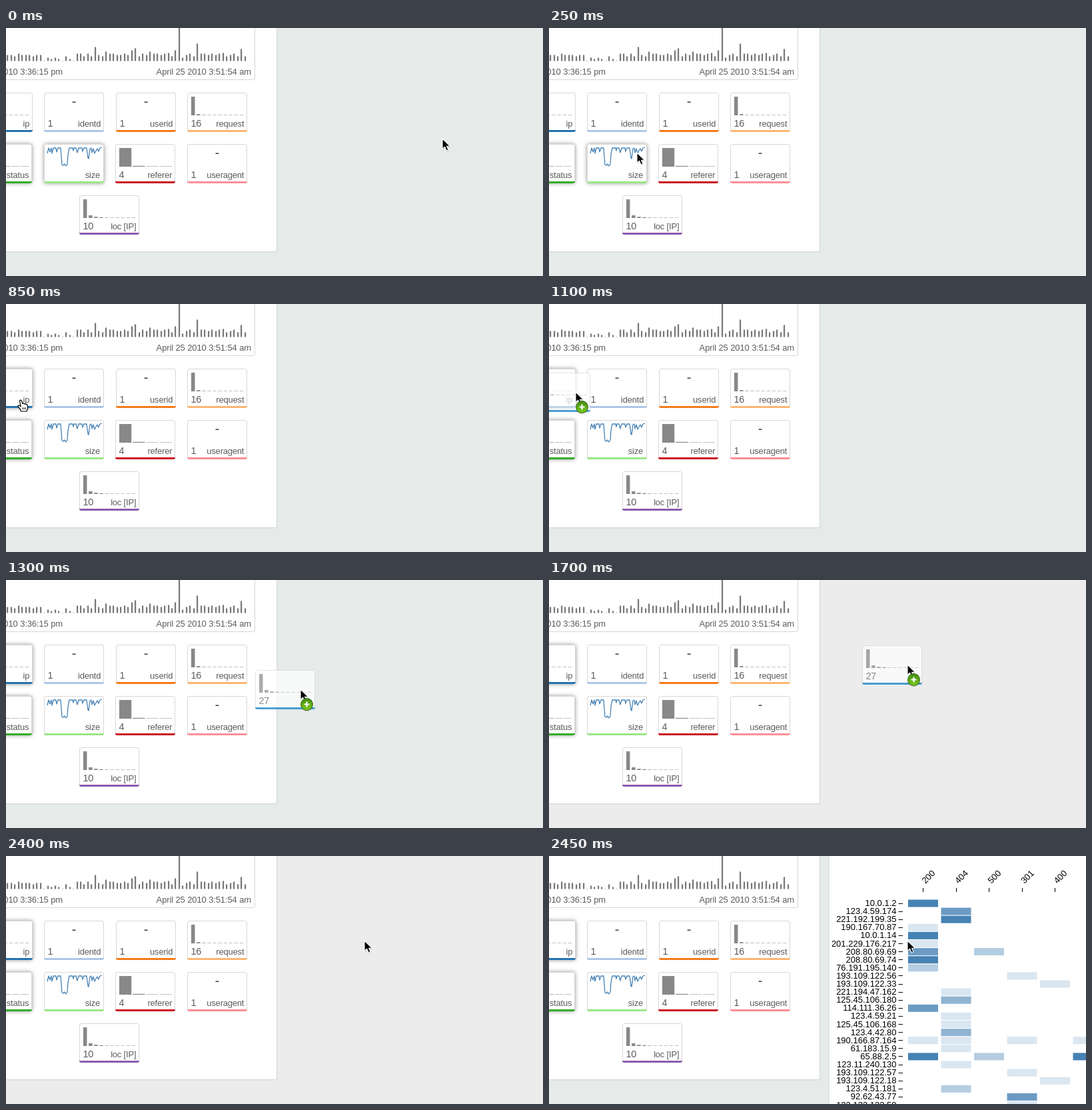
Animation of 806 by 372 pixels, one loop 3550 ms. Source, as an HTML page:

```html
<!DOCTYPE html>
<html lang="en">
<head>
<meta charset="utf-8">
<title>Drag a field onto the canvas</title>
<style>
html, body { margin: 0; width: 100%; height: 100%; overflow: hidden; background: #e6eae9; }
svg { display: block; width: 806px; height: 372px; }
text { font: 13px "Liberation Sans", Arial, sans-serif; fill: #5c5c5c; letter-spacing: -.2px; }
.date { letter-spacing: -.12px; }
.count { font-size: 14.5px; }
.dash { font-size: 20px; fill: #444; }
.axis { fill: #000; letter-spacing: 0; }
.end { text-anchor: end; }
.mid { text-anchor: middle; }

.bg, .results, .pointer, .arrow, .hand, .drag, .glow { animation: 3550ms step-end infinite; }
.bg { animation-name: bg; }
.results { animation-name: results; }
.pointer { animation-name: move; }
.arrow { animation-name: arrow; }
.hand { animation-name: hand; }
.drag { animation-name: drag; }
.glow { animation-name: none; }
.glow.size { animation-name: deselect; }
.glow.ip { animation-name: select; }

/* 50 ms = 1.4084 % */
@keyframes move {
  0%       { transform: translate(655px, 166px); animation-timing-function: steps(2); }
  2.8169%  { transform: translate(560px, 170px); animation-timing-function: steps(3); }
  7.0422%  { transform: translate(132px, 187px); animation-timing-function: steps(2); }
  9.8591%  { transform: translate(104px, 200px); animation-timing-function: steps(4); }
  15.4929% { transform: translate(100px, 203px); animation-timing-function: steps(5); }
  22.5352% { transform: translate(24px, 147px); }
  23.9436% { transform: translate(23px, 144px); animation-timing-function: steps(4); }
  29.5774% { transform: translate(18px, 126px); }
  30.9859% { transform: translate(40px, 132px); animation-timing-function: steps(3); }
  35.2112% { transform: translate(330px, 166px); }
  36.6197% { transform: translate(442px, 164px); animation-timing-function: steps(2); }
  39.4366% { transform: translate(515px, 140px); animation-timing-function: steps(3); }
  43.6619%, 100% { transform: translate(538px, 127px); }
}
@keyframes bg {
  0%       { fill: #e6eae9; }
  38.0281% { fill: #e6eae9; animation-timing-function: steps(4); }
  43.6619% { fill: #ececec; }
  69.0140%, 100% { fill: #e6eae9; }
}
@keyframes results  { 0% { opacity: 0; } 69.0140%, 100% { opacity: 1; } }
@keyframes arrow    { 0% { opacity: 1; } 8.4507% { opacity: 0; } 30.9859%, 100% { opacity: 1; } }
@keyframes hand     { 0% { opacity: 0; } 8.4507% { opacity: 1; } 30.9859%, 100% { opacity: 0; } }
@keyframes drag     { 0% { opacity: 0; } 30.9859% { opacity: 1; } 64.7887%, 100% { opacity: 0; } }
@keyframes deselect { 0% { opacity: 1; } 15.4929%, 100% { opacity: 0; } }
@keyframes select   { 0% { opacity: 0; } 23.9436%, 100% { opacity: 1; } }
</style>
</head>
<body>
<svg viewBox="0 0 806 372" xmlns="http://www.w3.org/2000/svg">
  <defs>
    <filter id="blur" x="-20%" y="-25%" width="140%" height="150%"><feGaussianBlur stdDeviation="3"/></filter>
    <linearGradient id="green" x1="0" y1="0" x2="0" y2="1">
      <stop offset="0" stop-color="#3f8a12"/><stop offset="1" stop-color="#7ccb1c"/>
    </linearGradient>
  </defs>
  <rect class="bg" width="806" height="372" fill="#e6eae9"/>

  <rect x="-10" y="-10" width="417.5" height="346.5" rx="3" fill="#000" opacity=".06"/>
  <rect x="-10.5" y="-10.5" width="417" height="346" rx="3" fill="#fff" stroke="#d9dcdb"/>
  <rect x="-10.5" y="-10.5" width="384" height="88" rx="2" fill="#fff" stroke="#d6d6d6"/>
  <g id="timeline" fill="#777"></g>
  <text class="date end" x="85" y="70">2010 3:36:15 pm</text>
  <text class="date end" x="368" y="70">April 25 2010 3:51:54 am</text>

  <g id="cards"></g>

  <g class="results" id="results" opacity="0">
    <rect x="420.5" y="-5" width="400" height="390" fill="#fff" stroke="#d9dcdb"/>
  </g>

  <g class="pointer">
    <g class="drag" id="drag" opacity="0"></g>
    <g class="arrow">
      <path d="M0 0V15.5L3.6 12.2 6.2 18 9 16.8 6.5 11.2H11.4Z" fill="#000" opacity=".18" transform="translate(.5 1.5)"/>
      <path d="M0 0V15.5L3.6 12.2 6.2 18 9 16.8 6.5 11.2H11.4Z" fill="#000" stroke="#fff" stroke-width="1.1" stroke-linejoin="round"/>
    </g>
    <g class="hand" opacity="0">
      <path d="M-2.5 1.2Q-1-.8 .5 1.2L2 5.5Q3.5 4.2 4.6 6 6.2 5 7.2 7 9.3 6.5 9.6 9V12.5L8 17H-.5L-1.5 14-5 9.8Q-5.2 7.6-3 8.2L-.8 9.8Z"
            fill="#fff" stroke="#000" stroke-width="1.2" stroke-linejoin="round"/>
      <path d="M2 11.2V14.2M4.2 11.2V14.2M6.4 11.2V14.2" stroke="#000" stroke-width=".9"/>
    </g>
    <g class="drag" opacity="0">
      <g transform="translate(9.5 22.5)">
        <circle cy="1" r="9.4" opacity=".2"/>
        <circle r="9" fill="url(#green)" stroke="#3c6d16"/>
        <path d="M-4 0H4M0-4V4" stroke="#fff" stroke-width="2.2"/>
      </g>
    </g>
  </g>
</svg>
<script>
const NS = 'http://www.w3.org/2000/svg';
const byId = id => document.getElementById(id);

function add(parent, tag, attrs, text) {
  const node = document.createElementNS(NS, tag);
  for (const key in attrs) node.setAttribute(key, attrs[key]);
  if (text !== undefined) node.textContent = text;
  return parent.appendChild(node);
}

// Timeline histogram
const heights = [
  9, 9, 7, 11, 9, 9, 9, 7, 9, 9, 0, 5, 3, 5, 3, 0, 7, 3, 0, 11, 11, 7,
  11, 7, 21, 9, 7, 14, 11, 11, 9, 9, 11, 9, 16, 19, 7, 11, 9, 14, 11, 11, 9, 11,
  12, 7, 16, 60, 5, 9, 11, 7, 26, 11, 11, 9, 11, 9, 11, 12, 7, 9, 11, 7, 18, 7
];
heights.forEach((h, i) => {
  const height = Math.max(h, .4);
  add(byId('timeline'), 'rect', { x: Math.round(1.4 + i * 5.48), y: 49.5 - height, width: 2.2, height });
});

// Field cards
function bars(g, n, second) {
  const step = 81 / n;
  for (let i = 0; i < n; i++) {
    const h = i ? Math.max(second / i ** 1.1, .7) : 28;
    add(g, 'rect', { x: 6 + i * step, y: 34 - h, width: step - (n > 8 ? 2.6 : 2), height: h, fill: h < 1 ? '#aaa' : '#888' });
  }
}

function card(parent, { x, y, name, color, count, n, second, glow }) {
  const g = add(parent, 'g', { transform: `translate(${x} ${y})` });
  if (glow) add(g, 'rect', { class: 'glow ' + name, width: 90, height: 59, rx: 3, fill: '#000', 'fill-opacity': .42, filter: 'url(#blur)' });
  add(g, 'rect', { x: .5, y: .5, width: 89, height: 58, rx: 2.5, fill: '#fff', stroke: '#d8d8d8' });
  add(g, 'path', { d: 'M0 56H90Q90 59 87 59H3Q0 59 0 56Z', fill: color });
  if (n) bars(g, n, second);
  else if (name !== 'size') add(g, 'text', { class: 'dash mid', x: 45, y: 20 }, '-');
  if (count) add(g, 'text', { class: 'count', x: 5.5, y: 51 }, count);
  add(g, 'text', { class: 'end', x: name === 'size' ? 84 : 85.3, y: 51 }, name);
  return g;
}

const ip = { x: -50, y: 97, name: 'ip', color: '#2474b0', count: 27, n: 10, second: 4 };
const cards = byId('cards');
[
  { ...ip, glow: true },
  { x: 57, y: 97, name: 'identd', color: '#aec6e6', count: 1 },
  { x: 165, y: 97, name: 'userid', color: '#f57c1a', count: 1 },
  { x: 272, y: 97, name: 'request', color: '#fdb673', count: 16, n: 10, second: 1.8 },
  { x: -51, y: 174, name: 'status', color: '#34ae2b', count: 6, n: 6, second: 3, glow: true },
  { x: 57, y: 174, name: 'size', color: '#9ce688', glow: true },
  { x: 164, y: 174, name: 'referer', color: '#cc1523', count: 4, n: 4, second: 1.2 },
  { x: 272, y: 174, name: 'useragent', color: '#fc8f97', count: 1 },
  { x: 110, y: 251, name: 'loc [IP]', color: '#8a5cb0', count: 10, n: 10, second: 4 }
].forEach(c => card(cards, c));

add(cards, 'polyline', {
  points: '62,188 64,180 66,186 68,180 69,188 71,180 75,180 76,186 78,180 82,180 84,205 86,206 88,204 90,207 92,204 ' +
    '93,190 95,180 100,180 101,184 102,180 105,180 107,187 109,180 114,180 115,185 117,180 121,180 123,195 124,196 ' +
    '126,181 128,180 129,187 131,181 133,188 135,184 137,181 139,185 141,180 144,179',
  fill: 'none', stroke: '#4682b4', 'stroke-width': 1.3, 'stroke-linejoin': 'round'
});

card(byId('drag'), { ...ip, x: -68, y: -29, color: '#057cc4' }).setAttribute('opacity', .7);

// Heat map: each row is an address and its column:level pairs
const rows = `10.0.1.2 0:5
123.4.59.174 1:4
221.192.199.35 1:5
190.167.70.87 0:1
10.0.1.14 0:5
201.229.176.217 0:1
208.80.69.69 0:4 2:2
208.80.69.74 0:5
76.191.195.140 0:2
193.109.122.56 3:1
193.109.122.33 4:1
221.194.47.162 1:1
125.45.106.180 1:3
114.111.36.26 0:4
123.4.59.21 1:1
125.45.106.168 1:1
123.4.42.80 1:3
190.166.87.164 0:1 1:1 3:1 5:1
61.183.15.9 1:1
65.88.2.5 0:5 2:2 5:5
123.11.240.130 1:1
193.109.122.57 3:1
193.109.122.18 4:1
123.4.51.181 1:2
92.62.43.77 3:4
123.123.123.59 3:1`.split('\n');
const results = byId('results');
const colStep = 49.5, rowStep = 12.1;

['200', '404', '500', '301', '400', '206'].forEach((code, i) => {
  const x = 561.5 + i * colStep;
  add(results, 'path', { d: `M${Math.floor(x) + .5} 48V54`, stroke: '#000' });
  add(results, 'text', { class: 'axis', transform: `translate(${x + 3.5} 42) rotate(-45)` }, code);
});
rows.forEach((row, i) => {
  const [address, ...cells] = row.split(' ');
  const y = 71 + i * rowStep;
  add(results, 'text', { class: 'axis end', x: 521.5, y: y + 4 }, address);
  add(results, 'path', { d: `M524.5 ${Math.floor(y) + .5}H531`, stroke: '#000' });
  for (const cell of cells) {
    const [col, level] = cell.split(':');
    add(results, 'rect', { x: 539 + col * colStep, y: y - 5.5, width: 45, height: 11, fill: '#4682b4', 'fill-opacity': level / 5 });
  }
});
</script>
</body>
</html>
```
